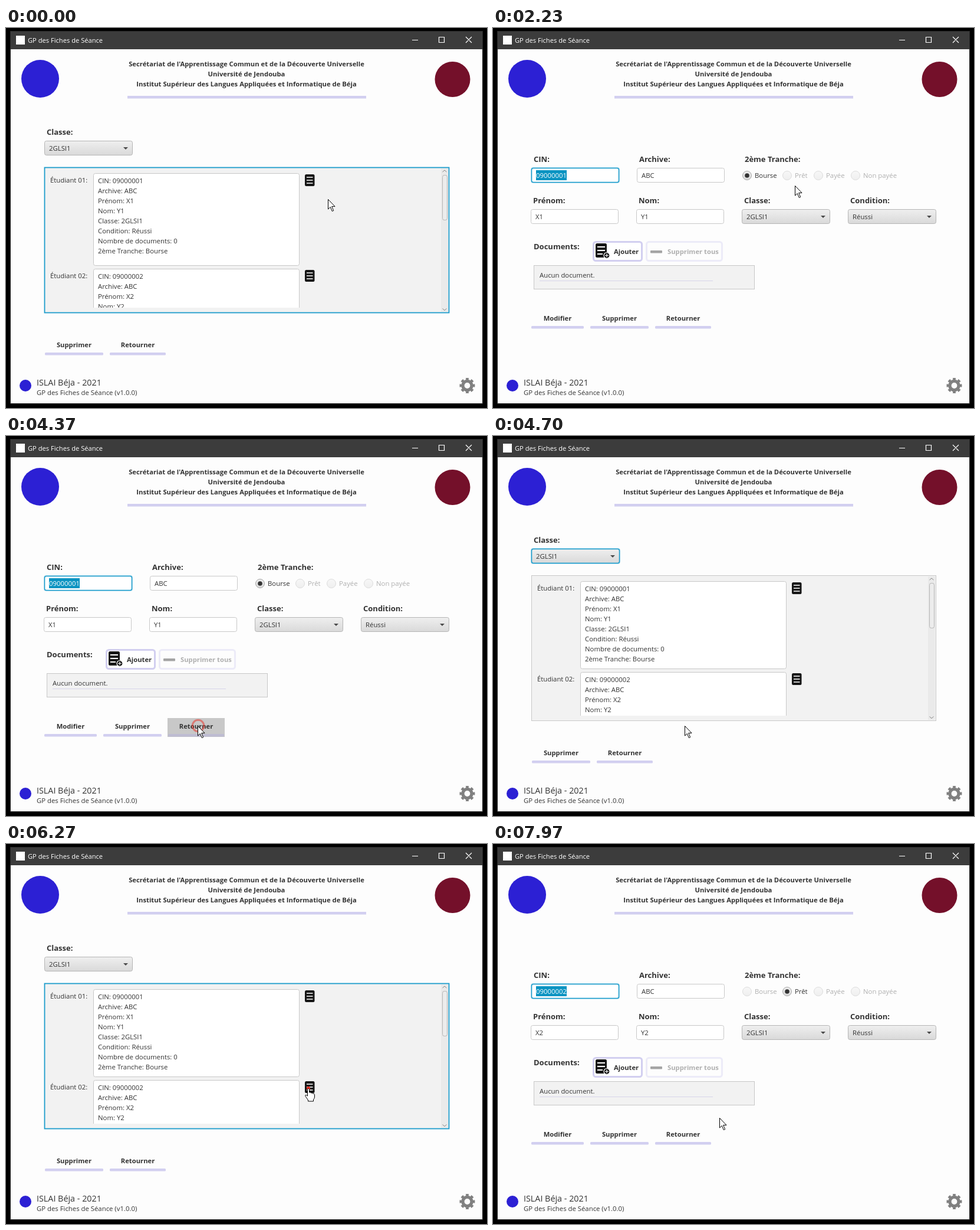
An HTML page for the animation above (8000 ms loop, 816 px wide and 644 px high).

```html
<!DOCTYPE html>
<html lang="fr">
<head>
<meta charset="utf-8">
<title>GP des Fiches de Séance</title>
<style>
  html, body { margin: 0; width: 100%; height: 100%; overflow: hidden; background: #000; }
  svg { display: block; width: 816px; height: 644px; font: 11.35px "Open Sans", "Noto Sans", sans-serif; fill: #333; }
  .bold { font-size: 11.25px; font-weight: 700; }
  .head { font-size: 13px; font-weight: 700; }
  .mid { text-anchor: middle; }
  .off { opacity: .38; }
</style>
</head>
<body>
<svg viewBox="0 0 816 644">
  <defs>
    <linearGradient id="shade" x2="0" y2="1">
      <stop stop-color="#efefef"/><stop offset="1" stop-color="#d9d9d9"/>
    </linearGradient>
    <linearGradient id="lit" x2="0" y2="1">
      <stop stop-color="#fafafa"/><stop offset="1" stop-color="#e6e6e6"/>
    </linearGradient>
    <clipPath id="view"><path d="M66 237H738V474H66Z"/></clipPath>
  </defs>
  <g id="frame"></g>
  <g id="page"></g>
  <circle id="ring" fill="none" stroke="#e8281c" stroke-width="3"/>
  <path id="cursor" fill="#fff" stroke="#000"/>
</svg>
<script>
const LOOP = 8000, SWITCH = 270, RING = 500;
const INK = '#161616', LINE = '#c8c8c8', BAR = '#d2cff0', PANEL = '#f2f2f2', WHITE = '#fff', FOCUS = '#1c9ccb';
const ARROW = 'M-.5 .5V17L3.3 13.4 6.3 20.5 8.7 19.5 5.7 12.4H11Z';
const HAND = 'M-1.5 1.5Q0-1 1.5 1.5V7Q4 6 4.5 8Q7 7 7.5 9Q10 8.5 10.5 10.5V15Q10 18 8.5 19V22H-.5V20L-5 13.5Q-6 11-3.5 11.5L-1.5 13Z';
const $ = id => document.getElementById(id);

const text = (x, y, s, cls = '', more = '') => `<text x="${x}" y="${y}" class="${cls}" ${more}>${s}</text>`;
const rect = (x, y, w, h, fill, more = '') => `<rect x="${x}" y="${y}" width="${w}" height="${h}" fill="${fill}" ${more}/>`;
const box = (x, y, w, h, fill, stroke = LINE, r = 3, sw = 1) =>
  rect(x + .5, y + .5, w - 1, h - 1, fill, `stroke="${stroke}" stroke-width="${sw}" rx="${r}"`);
const path = (d, stroke, sw = 1, more = '') => `<path d="${d}" fill="none" stroke="${stroke}" stroke-width="${sw}" ${more}/>`;
const disc = (x, y, r, fill, more = '') => `<circle cx="${x}" cy="${y}" r="${r}" fill="${fill}" ${more}/>`;

const glow = (x, y, w, h) => rect(x - 1, y - 1, w + 2, h + 2, '#b4deee', 'rx="4"');
const combo = (x, y, s, focus, hover) =>
  (focus ? glow(x, y, 150, 25) : '') +
  box(x, y, 150, 25, `url(#${hover ? 'lit' : 'shade'})`, focus ? FOCUS : '#b5b5b5', 3, focus ? 1.5 : 1) +
  text(x + 8, y + 17, s) +
  `<path d="M${x + 134} ${y + 11}h8l-4 4Z" fill="#4a4a4a"/>`;
const field = (x, y, s, focus) => focus
  ? glow(x, y, 149, 25) + box(x, y, 149, 25, WHITE, FOCUS, 3, 1.5) +
    rect(x + 8, y + 4, 52, 17, '#0a94c2') + text(x + 8, y + 17, s, '', 'fill="#fff"')
  : box(x, y, 149, 25, WHITE) + text(x + 8, y + 17, s);
const button = (x, y, w, s, hover) =>
  (hover ? rect(x - 1, y - 27, w + 2, 32, '#c8c8c8') : '') +
  rect(x, y, w, 4.5, hover ? '#bebcd2' : BAR, 'rx="1.5"') +
  text(x + w / 2, y - 9, s, 'bold mid');
const sheet = (x, y) => rect(x, y, 16.5, 20, INK, 'rx="2.5"') +
  path(`M${x + 3} ${y + 5}h10.5m-10.5 5h10.5m-10.5 5h10.5`, '#fff', 1.6);

function frame() {
  const gear = [782.5, 606];
  return rect(7, 5, 802, 632, '#2c2c2c') + rect(8, 6, 800, 30, '#3c3c3c') + rect(8, 36, 800, 600, '#fdfdfd') +
    rect(17, 13, 15, 15, '#fff') + text(37, 25, 'GP des Fiches de Séance', '', 'fill="#fff" font-size="11.15"') +
    path('M689 20.5h10M734.5 15.5h9v9h-9ZM780 15l10 10m0-10l-10 10', '#fff', 1.2) +
    disc(58, 86, 32, '#2c20d4') + disc(757.5, 87, 30, '#74102a') + disc(33, 606, 10, '#2c20d4') +
    ["Secrétariat de l'Apprentissage Commun et de la Découverte Universelle", 'Université de Jendouba',
      'Institut Supérieur des Langues Appliquées et Informatique de Béja']
      .map((s, i) => text(408, 65 + 17 * i, s, 'bold mid')).join('') +
    rect(206, 115, 405, 4.5, BAR) +
    text(52, 606, 'ISLAI Béja - 2021', '', 'font-size="14.35"') + text(52, 622, 'GP des Fiches de Séance (v1.0.0)') +
    disc(...gear, 7.6, 'none', 'stroke="#808080" stroke-width="5.4"') +
    disc(...gear, 10.8, 'none', 'stroke="#808080" stroke-width="4.4" pathLength="16" stroke-dasharray="1.1 .9" stroke-dashoffset=".55"');
}

function student(n, y, h) {
  const lines = [`CIN: 0900000${n}`, 'Archive: ABC', `Prénom: X${n}`, `Nom: Y${n}`, 'Classe: 2GLSI1',
    'Condition: Réussi', 'Nombre de documents: 0', '2ème Tranche: Bourse'];
  return text(75, y + 16, `Étudiant 0${n}:`) + box(148, y, 350, h, WHITE) +
    lines.map((s, i) => text(156, y + 17 + 17 * i, s)).join('') + sheet(507, y + 2);
}

function listPage({ cardHeight, focus, hover }) {
  const onPanel = focus === 'panel';
  return text(69, 181, 'Classe:', 'head') + combo(65, 191, '2GLSI1', !onPanel) +
    box(65, 236, 687, 247, PANEL, onPanel ? FOCUS : LINE, 0, onPanel ? 1.8 : 1) +
    `<g clip-path="url(#view)">${student(1, 246, cardHeight)}${student(2, 251 + cardHeight, cardHeight)}</g>` +
    rect(738, 238, 12, 243, '#eaeaea') + box(740, 249, 9, 77, '#ececec', '#b5b5b5', 3) +
    path('M740.5 244l3.5-3 3.5 3M740.5 475.5l3.5 3 3.5-3', '#858585') +
    button(66, 550, 99, 'Supprimer', hover === 'delete') + button(176, 550, 95, 'Retourner', hover === 'back');
}

function formPage({ student: n, grant, hover }) {
  const labels = [[69, 227, 'CIN'], [248, 227, 'Archive'], [427, 227, '2ème Tranche'], [68, 297, 'Prénom'],
    [247, 297, 'Nom'], [426, 297, 'Classe'], [606, 297, 'Condition'], [69, 375, 'Documents']];
  const radios = [[431, 'Bourse'], [499, 'Prêt'], [552, 'Payée'], [615, 'Non payée']];
  return labels.map(([x, y, s]) => text(x, y, s + ':', 'head')).join('') +
    field(65, 237, `0900000${n}`, true) + field(244, 237, 'ABC') + field(64, 307, 'X' + n) + field(243, 307, 'Y' + n) +
    radios.map(([x, s], i) => `<g class="${i === grant ? '' : 'off'}">` +
      disc(x, 250, 7.5, 'url(#shade)', 'stroke="#a8a8a8"') + (i === grant ? disc(x, 250, 3.8, '#333') : '') +
      text(x + 13, 254, s) + '</g>').join('') +
    combo(422, 307, '2GLSI1', false, hover === 'combo') + combo(602, 307, 'Réussi') +
    box(170, 362, 83, 33, WHITE, BAR, 4, 3) + rect(174, 365, 19, 24, INK, 'rx="2.5"') +
    path('M177 371h13m-13 6h13m-13 6h9', '#fff', 1.8) + disc(193, 385.5, 5, INK, 'stroke="#fff" stroke-width="1.2"') +
    path('M190 385.5h6m-3-3v6', '#fff', 1.2) + text(205, 383, 'Ajouter', 'bold') +
    `<g class="off">${box(260, 362, 129, 33, WHITE, BAR, 4, 3)}${rect(267, 377, 20, 4.5, INK, 'rx="1"')}${text(296, 383, 'Supprimer tous', 'bold')}</g>` +
    box(69, 402, 375, 41, PANEL, LINE, 0) + path('M79 428.5H373', '#d6d4ea') + text(79, 423, 'Aucun document.') +
    button(65, 505, 89, 'Modifier') + button(165, 505, 99, 'Supprimer', hover === 'delete') +
    button(275, 505, 95, 'Retourner', hover === 'back');
}

// Hot areas: name, left, top, right, bottom
const listHot = secondIcon => [['icon', 507, 248, 523, 268], ['icon', 507, secondIcon, 523, secondIcon + 20],
  ['delete', 65, 523, 166, 555], ['back', 175, 523, 272, 555]];
const formHot = [['combo', 422, 307, 572, 332], ['delete', 164, 478, 265, 510], ['back', 274, 478, 371, 510]];

const clicks = [1070, 4200, 6270];
const pages = [
  { draw: listPage, cardHeight: 157, hot: listHot(410) },
  { draw: formPage, student: 1, grant: 0, hot: formHot },
  { draw: listPage, cardHeight: 149, hot: listHot(402) },
  { draw: formPage, student: 2, grant: 1, hot: formHot },
];

// Pointer moves: start, end, then start, control and end points
const moves = [
  [270, 500, 547, 290, 531, 272, 514, 257],
  [2200, 2930, 514, 257, 511, 330, 326, 491],
  [4900, 5530, 326, 491, 430, 462, 513, 414],
  [7540, 7970, 513, 414, 452, 446, 385, 464],
];

function pointer(t) {
  const [a, b, x0, y0, x1, y1, x2, y2] = moves.findLast(m => t >= m[0]) || moves[0];
  const p = Math.sin(Math.PI / 2 * Math.min(1, Math.max(0, (t - a) / (b - a))));
  const bend = (u, v, w) => (1 - p) ** 2 * u + 2 * p * (1 - p) * v + p * p * w;
  return [bend(x0, x1, x2), bend(y0, y1, y2)].map(Math.round);
}

let shown = '';
function tick() {
  const t = performance.now() % LOOP;
  const index = clicks.filter(c => t >= c + SWITCH).length;
  const page = pages[index];
  const [x, y] = pointer(t);
  const hit = page.hot.find(([, l, top, r, b]) => x >= l && x <= r && y >= top && y <= b);
  const hover = hit ? hit[0] : '';
  const focus = index === 2 && t < clicks[2] ? 'combo' : 'panel';

  const key = [index, hover, focus].join();
  if (key !== shown) {
    $('page').innerHTML = page.draw({ ...page, hover, focus });
    shown = key;
  }

  const click = clicks.find(c => t >= c && t < c + RING);
  const age = click === undefined ? -1 : t - click;
  const busy = age > 150 && age < SWITCH;
  const hand = hover && hover !== 'combo' && !busy;
  $('cursor').setAttribute('d', hand ? HAND : ARROW);
  $('cursor').setAttribute('transform', `translate(${x} ${y})`);

  const p = age / RING;
  $('ring').setAttribute('opacity', age < 0 ? 0 : (1 - p) ** 1.7);
  $('ring').setAttribute('r', age < 0 ? 1 : 1.5 + 24 * p);
  $('ring').setAttribute('cx', x);
  $('ring').setAttribute('cy', y);
  requestAnimationFrame(tick);
}

$('frame').innerHTML = frame();
tick();
</script>
</body>
</html>
```
